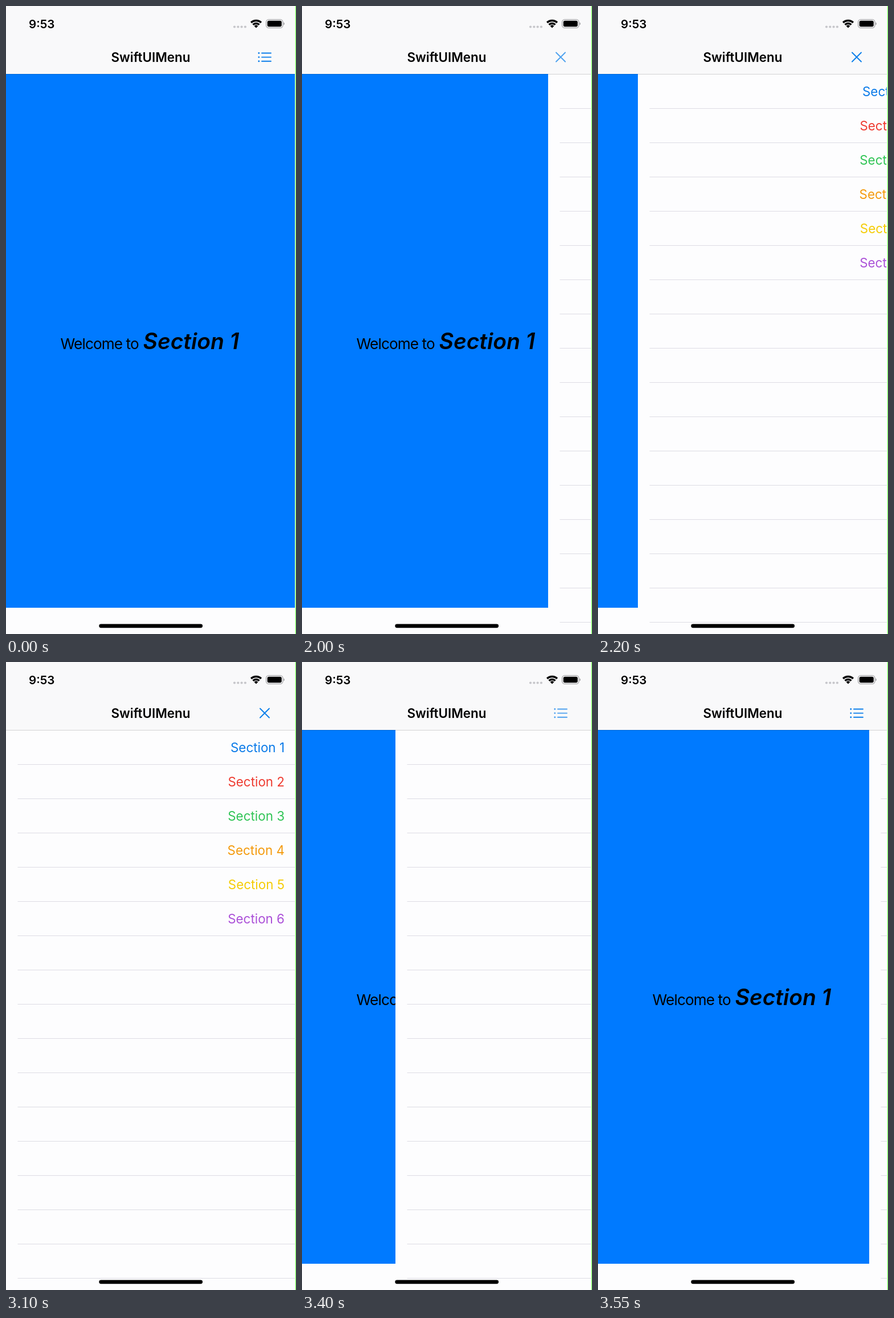
Recreate the animation shown at these times as an HTML page. Size 509 by 1100 pixels, loop 3600 ms.

```html
<!DOCTYPE html>
<html lang="en">
<head>
<meta charset="utf-8">
<title>Slide-in menu</title>
<style>
  html, body { margin: 0; width: 100%; height: 100%; overflow: hidden; background: #fdfdfe; }
  svg { display: block; width: 509px; height: 1100px; }
  text {
    font-family: Inter, "Liberation Sans", sans-serif;
    font-size: 22.4px;
    font-optical-sizing: none;
    white-space: pre;
  }
  .semi { font-weight: 600; }
  .icon { fill: none; stroke: #0a7eea; stroke-width: 1.9; stroke-linecap: round; }
</style>
</head>
<body>
<svg viewBox="0 0 509 1100">
  <rect width="509" height="1100" fill="#fdfdfe"/>

  <rect y="119" width="509" height="935" fill="#007aff"/>
  <text x="95.5" y="601" style="font-size:26.2px;letter-spacing:-.9px">Welcome to</text>
  <text x="240.6" y="601" class="semi" style="font-size:39px;font-style:italic;letter-spacing:-.05px">Section 1</text>

  <g id="panel">
    <rect y="119" width="509" height="981" fill="#fdfdfe"/>
  </g>

  <rect width="509" height="119" fill="#f9f9fa"/>
  <rect y="119" width="509" height="1" opacity=".17"/>
  <text x="40" y="38.5" class="semi" style="font-size:20.6px">9:53</text>
  <text x="254" y="98" class="semi" text-anchor="middle">SwiftUIMenu</text>

  <g fill="#c6c6ca">
    <circle cx="401" cy="36.5" r="2.1"/>
    <circle cx="407.3" cy="36.5" r="2.1"/>
    <circle cx="413.6" cy="36.5" r="2.1"/>
    <circle cx="419.9" cy="36.5" r="2.1"/>
  </g>
  <g id="wifi" transform="translate(439 38.6)" fill="none" stroke="#000"></g>
  <rect x="456.6" y="23.6" width="29.3" height="14.8" rx="4.6" fill="none" stroke="#a6a6a8" stroke-width="1.35"/>
  <rect x="458.7" y="25.7" width="25.1" height="10.6" rx="2.8"/>
  <path d="M487.2 28.6q1.8.7 1.8 2.4t-1.8 2.4z" fill="#a6a6a8"/>

  <g id="list" class="icon">
    <path d="M449 82.5h16M449 89.6h16M449 96.8h16"/>
    <path d="M443.8 82.5h0M443.8 89.6h0M443.8 96.8h0" stroke-width="2.9"/>
  </g>
  <path id="close" class="icon" d="M446 81.5l16 16M462 81.5l-16 16"/>

  <rect x="163.3" y="1082.4" width="181.8" height="6.8" rx="3.4"/>
  <rect x="507" width="1" height="1100" fill="#dcffd2"/>
  <rect x="508" width="1" height="1100" fill="#7dff62"/>
</svg>
<script>
  const LOOP = 3600, STEP = 50, WIDTH = 509;
  const $ = id => document.getElementById(id);

  function add(parent, tag, attrs, text = "") {
    const el = document.createElementNS("http://www.w3.org/2000/svg", tag);
    for (const key in attrs) el.setAttribute(key, attrs[key]);
    el.textContent = text;
    parent.append(el);
  }

  for (let i = 0; i < 16; i++)
    add($("panel"), "rect", { x: 20.5, y: 179 + 60 * i, width: 489, height: 1, fill: "#dddce4" });

  ["#0a7ae8", "#ee3b30", "#30c455", "#f49a0c", "#f5cc05", "#ab50d8"].forEach((fill, i) =>
    add($("panel"), "text", { x: 489, y: 158 + 60 * i, fill, "text-anchor": "end" }, `Section ${i + 1}`));

  // Wi-Fi bands: middle radius and thickness
  for (const [r, w] of [[13.1, 3.3], [8.1, 3.3], [2.5, 5]]) {
    const x = r * Math.sin(0.75), y = -r * Math.cos(0.75);
    add($("wifi"), "path", { d: `M${-x} ${y}A${r} ${r} 0 0 1 ${x} ${y}`, "stroke-width": w });
  }

  const clamp = v => Math.min(1, Math.max(0, v));
  const ease = (t, start, span) => {
    const s = clamp((t - start) / span);
    return s * s * (3 - 2 * s);
  };

  function panelX(t) {
    if (t < 3100) return WIDTH * (1 - ease(Math.min(t, 2200), 1906, 383));
    return WIDTH * ease(t, 3277.9, 322.1);
  }

  // Button dims on press, then recovers after release
  function dim(t, press, release) {
    if (t < press) return 1;
    if (t < release) return 1 - 0.7 * clamp((t - press + STEP) / (release - press));
    return 0.3 + 0.7 * clamp((t - release + STEP) / 250);
  }

  function draw(now) {
    const t = Math.floor((now % LOOP) / STEP) * STEP;
    const open = t >= 1900 && t < 3300;
    $("panel").setAttribute("transform", `translate(${Math.round(panelX(t))} 0)`);
    $("list").style.display = open ? "none" : "";
    $("close").style.display = open ? "" : "none";
    const alpha = t < 3100 ? dim(t, 1850, 1900) : dim(t, 3150, 3300);
    $("list").style.opacity = $("close").style.opacity = alpha;
  }

  const began = performance.now();
  function tick() {
    draw(performance.now() - began);
    requestAnimationFrame(tick);
  }
  tick();
</script>
</body>
</html>
```
